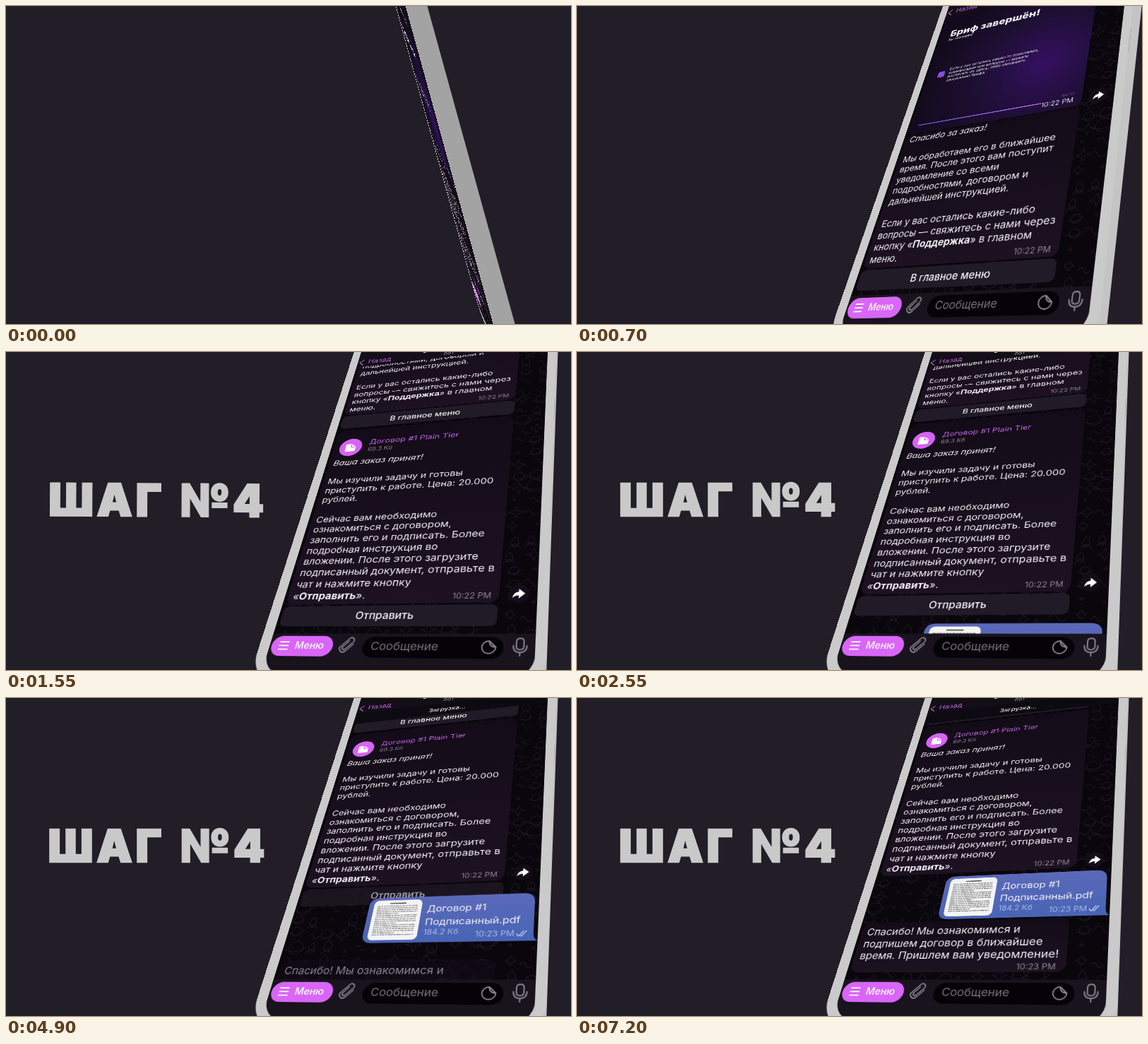
An HTML page for the animation above (7.25 s loop, 800 px wide and 450 px high).

```html
<!DOCTYPE html>
<html lang="ru">
<head>
<meta charset="utf-8">
<style>
  html, body { margin: 0; width: 100%; height: 100%; overflow: hidden; background: #211e28; }
  #stage { position: absolute; left: 0; top: 0; width: 800px; height: 450px; overflow: hidden; }
  #stage > svg { position: absolute; left: 0; top: 0; }
  #title text { font-size: 63px; font-weight: 900; letter-spacing: 5px; word-spacing: 4px;
    fill: #c9c9c9; stroke: #c9c9c9; stroke-width: 2.5px; }
  #phone { position: absolute; left: 0; top: 0; width: 0; height: 0; transform-origin: 0 0; }
  #phone svg { position: absolute; left: -17px; top: -120px; overflow: visible; }
  text { font-family: Inter, Roboto, sans-serif; white-space: pre; }
  #phone text { font-size: 17.4px; fill: #f4f1f6; }
  #phone .s { font-size: 13px; fill: #8d8593; }
  #phone .m { text-anchor: middle; font-weight: 500; }
  #phone .e { text-anchor: end; }
  #phone .i { font-style: italic; }
  #phone .v { fill: #c565e6; }
  #phone .b { font-size: 13px; fill: #a9b9e8; }
  .l { fill: none; stroke-width: 1.8; stroke-linecap: round; stroke-linejoin: round; }
</style>
</head>
<body>
<div id="stage">
  <svg width="800" height="450">
    <polygon id="side"/>
    <g id="title"><text x="59.5" y="232">ШАГ №4</text></g>
  </svg>
  <div id="phone"></div>
</div>
<script>
const $ = id => document.getElementById(id);
const PITCH = 21.7, SCREEN_W = 390, SCREEN_H = 668;

// drawing helpers in phone units
const text = (x, y, s, cls = '', more = '') => `<text x="${x}" y="${y}" class="${cls}" ${more}>${s}</text>`;
const rect = (x, y, w, h, r, fill, more = '') =>
  `<rect x="${x}" y="${y}" width="${w}" height="${h}" rx="${r}" fill="${fill}" ${more}/>`;
const line = (d, stroke, more = '') => `<path class="l" d="${d}" stroke="${stroke}" ${more}/>`;
const lines = (x, y, list) => list.map((s, i) => s && text(x, y + i * PITCH, s)).join('');
const button = (y, s) => rect(5, y, 331, 35, 9, '#211a27') + text(170, y + 23.5, s, 'm', 'style="font-size:17px"');
const share = y => `<circle cx="364" cy="${y}" r="15" fill="#140d19"/>
  <path d="M355 ${y + 7}q2-10 9-10v-5l9 8-9 8v-5q-5 0-9 4z" fill="#fff"/>`;

function doodles() {
  let seed = 11, d = '';
  const rnd = n => (seed = (seed * 16807) % 2147483647) / 2147483647 * n;
  const kinds = [
    r => `m${-r} 0a${r} ${r} 0 1 0 ${2 * r} 0a${r} ${r} 0 1 0 ${-2 * r} 0m${-r / 2} 2q${r * 1.5} ${r} ${r * 3} ${-4}`,
    r => `m0 ${-r}l3 ${r - 3} ${r - 3} 3 ${3 - r} 3-3 ${r - 3}-3 ${3 - r} ${3 - r}-3 ${r - 3}-3z`,
    r => `m0 ${-r}q${r} ${r} 4 ${2 * r}h-8q${4 - r} ${-r} 4 ${-2 * r}m-4 ${2 * r}l-5 5m13-5l5 5m-9-${r}a3 3 0 1 0 .1 0`,
    r => `m${-r} 0q${r / 2} ${-r} ${r} 0t${r} 0`,
    r => `m0 0a2 2 0 1 0 .1 0`
  ];
  for (let y = -90; y < 680; y += 26)
    for (let x = 10; x < 390; x += 28)
      d += `M${x + rnd(12)} ${y + rnd(12)}` + kinds[Math.floor(rnd(5))](7 + rnd(6));
  return line(d, '#23172b', 'style="stroke-width:1.1"');
}

const brief = rect(5, -1010, 331, 328, 14, 'url(#glow)') +
  text(28, -927, 'Бриф завершён!', '', 'style="font-size:23.6px;font-weight:800"') +
  text(28, -915, 'Вы молодец!', '', 'style="font-size:9px"') +
  ['Если у вас остались какие-то пожелания,', 'комментарии или вопросы — можете',
   'расписать их здесь, либо завершить', 'заполнение брифа.']
    .map((s, i) => text(54, -829 + i * 9.6, s, '', 'style="font-size:9px"')).join('') +
  rect(30, -830, 15, 15, 4, '#8a4be0') +
  rect(22, -702, 243, 2, 1, 'url(#bar)') +
  text(322, -708, 'Шаг 7/7', 'e', 'style="font-size:6px;fill:#8b57c8"') +
  text(322, -692, '10:22 PM', 's e', 'style="fill:#e8e2ee"') + share(-697);

const thanks = rect(5, -679, 331, 264, 14, 'url(#msg)') +
  text(14, -424 - 11 * PITCH, 'Спасибо за заказ!', 'i') +
  lines(14, -424 - 9 * PITCH, [
    'Мы обработаем его в ближайшее', 'время. После этого вам поступит', 'уведомление со всеми',
    'подробностями, договором и', 'дальнейшей инструкцией.', '',
    'Если у вас остались какие-либо', 'вопросы — свяжитесь с нами через',
    'кнопку «<tspan font-weight="700">Поддержка</tspan>» в главном', 'меню.']) +
  text(324, -422, '10:22 PM', 's e') + button(-412, 'В главное меню');

const contract = rect(5, -371, 331, 382, 14, 'url(#msg)') +
  '<circle cx="39" cy="-325.500" r="22" fill="#d863f5"/>' +
  '<path d="M30-333h10l8 7v10h-18z" fill="#fff" stroke="#fff" stroke-width="2" stroke-linejoin="round"/>' +
  line('M40-333v7h7', '#d863f5') +
  text(74, -330, 'Договор #1 Plain Tier', 'v', 'style="font-size:16.4px"') + text(74, -312.5, '69.3 Кб', 's') +
  text(14, 1.5 - 13 * PITCH, 'Ваша заказ принят!', 'i') +
  lines(14, 1.5 - 11 * PITCH, [
    'Мы изучили задачу и готовы', 'приступить к работе. Цена: 20.000', 'рублей.', '',
    'Сейчас вам необходимо', 'ознакомиться с договором,', 'заполнить его и подписать. Более',
    'подробная инструкция во', 'вложении. После этого загрузите', 'подписанный документ, отправьте в',
    'чат и нажмите кнопку', '«<tspan font-weight="700">Отправить</tspan>».']) +
  text(325, 4, '10:22 PM', 's e') + share(-3) + `<g id="send">${button(14, 'Отправить')}</g>`;

let page = rect(135, 0, 78, 73, 8, '#f3f3f3') + rect(161, 5, 26, 2, 0, '#555');
for (let i = 0; i < 16; i++)
  page += line(`M141 ${11 + i * 3.5}h${i % 5 == 4 ? 36 : 66}`, '#777',
    `style="stroke-width:1.3;stroke-linecap:butt" stroke-dasharray="${5 + i * 7 % 6} 1 3 1"`);

const pdf = '<path d="M143-5H368Q384-5 384 11V66Q384 75 390 78H143Q127 78 127 62V11Q127-5 143-5z" fill="url(#blue)"/>' + page +
  text(222, 24, 'Договор #1', '', 'style="font-size:16.5px"') +
  text(222, 47.5, 'Подписанный.pdf', '', 'style="font-size:16.5px"') +
  text(222, 65, '', 'b', 'id="size"') + text(357, 70, '10:23 PM', 'b e') +
  '<g id="busy"><circle cx="174" cy="36" r="23" fill="#26262cdd"/>' +
  line('M168 30l12 12M180 30l-12 12', '#fff') +
  '<circle id="ring" class="l" cx="174" cy="36" r="20" stroke="#fff" pathLength="100"/>' +
  line('M361 66a6 6 0 1 0 12 0a6 6 0 1 0-12 0M367 62v4h4', '#a9b9e8', 'style="stroke-width:1.3"') + '</g>' +
  `<g id="done">${line('M360 66l3 4 7-9M366 69l1 1 7-9', '#c3d0f5', 'style="stroke-width:1.4"')}</g>`;

const reply = rect(5, 570, 328, 90, 14, 'url(#msg)') +
  lines(14, 594, ['Спасибо! Мы ознакомимся и', 'подпишем договор в ближайшее', 'время. Пришлем вам уведомление!']) +
  text(319, 656, '10:23 PM', 's e');

const header = rect(0, -106, 390, 157, 0, '#130e18') + line('M13 29l-8 8 8 8', '#c565e6') +
  text(23, 42, 'Назад', 'v', 'style="font-size:17px"') + text(195, 28, 'Бланк заказа', 'm') + text(195, 44, 'бот', 's m') +
  `<g id="loading">${rect(0, 51, 390, 34, 0, '#0e0a12')}${text(195, 74, 'Загрузка…', 'm', 'style="font-size:14px"')}</g>`;

const footer = rect(0, 672, 390, 80, 0, '#18131d') +
  rect(3, 676, 98, 33, 16.5, '#d966f7') + line('M16 686h14M16 692h14M16 698h14', '#fff') +
  text(41, 697.5, 'Меню', '', 'style="font-size:15.5px;font-weight:600"') +
  line('M132 689l-10 11q-4 4-8 0t0-8l11-12q3-3 6 0t0 6l-10 11q-2 2-4 0t0-4l8-9', '#8b8590') +
  rect(147, 677, 201, 33, 16.5, '#050307') + text(159, 698.5, 'Сообщение', '', 'style="fill:#77717c"') +
  line('M328 683a9.500 9.500 0 1 0 9.500 9.500q-9 0-9.500-9.500l9.500 9.500', '#8b8590') +
  line('M370 679q5 0 5 5v7q0 5-5 5t-5-5v-7q0-5 5-5M361 690q0 10 9 10t9-10M370 700v5', '#8b8590');

$('phone').innerHTML = `<svg width="422" height="872" viewBox="-17 -120 422 872">
  <defs>
    <clipPath id="clip">${rect(0, -106, 390, 844, 34, '#000')}</clipPath>
    <radialGradient id="glow" cx=".75" cy=".65" r=".75">
      <stop stop-color="#341060"/><stop offset=".5" stop-color="#1e0f34"/><stop offset="1" stop-color="#130b1d"/></radialGradient>
    <linearGradient id="bar"><stop stop-color="#6a5af0"/><stop offset="1" stop-color="#c070f0"/></linearGradient>
    <linearGradient id="msg" x2="0" y2="1"><stop stop-color="#130c18"/><stop offset="1" stop-color="#1d1122"/></linearGradient>
    <linearGradient id="blue" x2="0" y2="1"><stop stop-color="#5b69b9"/><stop offset="1" stop-color="#4864b4"/></linearGradient>
  </defs>
  ${rect(402, 205, 5, 55, 2, '#b5b5b5')}${rect(-17, -120, 422, 872, 48, '#cacaca')}
  <g clip-path="url(#clip)">${rect(0, -106, 390, 844, 0, '#09060c')}${doodles()}
    <g id="chat">${brief}${thanks}<g id="contract">${contract}</g></g>
    <g id="pdf">${pdf}</g><g id="reply">${reply}</g>${header}${footer}</g></svg>`;

// screen corners: top left, top right, bottom right, bottom left
const EDGE = [[540, -45], [577, 45], [695, 470], [658, 380]];
const NEAR = [[529, -6], [783.6, -75], [730, 392], [389, 407]];
const REST = [[503, 0], [768.4, -32.7], [750.4, 395], [379.8, 395]];

const mix = (a, b, p) => a + (b - a) * p;
const mixQuad = (a, b, p) => a.map((c, i) => c.map((v, j) => mix(v, b[i][j], p)));

function homography([[x0, y0], [x1, y1], [x2, y2], [x3, y3]]) {
  const ax = x1 - x2, ay = y1 - y2, bx = x3 - x2, by = y3 - y2;
  const sx = x0 - x1 + x2 - x3, sy = y0 - y1 + y2 - y3, den = ax * by - bx * ay;
  const g = (sx * by - bx * sy) / den, h = (ax * sy - sx * ay) / den;
  return {
    a: (x1 - x0 + g * x1) / SCREEN_W, b: (x3 - x0 + h * x3) / SCREEN_H, c: x0,
    d: (y1 - y0 + g * y1) / SCREEN_W, e: (y3 - y0 + h * y3) / SCREEN_H, f: y0,
    g: g / SCREEN_W, h: h / SCREEN_H
  };
}

function project(m, u, v) {
  const w = m.g * u + m.h * v + 1;
  return [(m.a * u + m.b * v + m.c) / w, (m.d * u + m.e * v + m.f) / w];
}

function draw(t) {
  const span = (a, b) => Math.min(1, Math.max(0, (t - a) / (b - a)));
  const out = (a, b, n = 3) => 1 - (1 - span(a, b)) ** n;
  const inOut = (a, b) => { const p = span(a, b); return p * p * (3 - 2 * p); };
  const shift = (id, y) => $(id).setAttribute('transform', `translate(0 ${y})`);
  const show = (id, on) => $(id).setAttribute('opacity', +on);

  const turn = out(0, 700), settle = inOut(700, 1500);
  const m = homography(t < 700 ? mixQuad(EDGE, NEAR, turn) : mixQuad(NEAR, REST, settle));
  $('phone').style.transform =
    `matrix3d(${[m.a, m.d, 0, m.g, m.b, m.e, 0, m.h, 0, 0, 1, 0, m.c, m.f, 0, 1].map(v => v.toFixed(9))})`;

  // the side wall starts under the front face so that no seam shows
  const depth = t < 700 ? mix(30, 12, turn) : mix(12, 2, settle);
  const [p, q] = [project(m, 398, -110), project(m, 398, 745)];
  const reach = depth + project(m, 405, 400)[0] - project(m, 398, 400)[0];
  $('side').setAttribute('points', [p, [p[0] + reach, p[1]], [q[0] + reach, q[1]], q].join(' '));
  const grey = Math.round(mix(163, 196, turn));
  $('side').setAttribute('fill', `rgb(${grey},${grey},${grey})`);

  const enter = out(900, 1800, 4);
  $('title').setAttribute('transform',
    `translate(214 ${209 + 60 * (1 - enter)}) rotate(${60 * (1 - enter)}) scale(${enter} 1) translate(-214 -209)`);
  show('title', span(900, 1400));

  const first = inOut(950, 1400), second = inOut(2450, 2800), third = inOut(4680, 5100);
  shift('chat', 1041 - 430 * first - 92 * second - 53 * third);
  show('contract', first);
  show('send', 1 - third ** 2);
  shift('pdf', 680 - 97 * second - 94 * third);
  shift('reply', 150 * (1 - third));
  show('reply', third);

  const sent = Math.min(184.2, Math.max(0, (t - 2800) * 0.192)), ready = sent >= 184.2;
  $('size').textContent = ready ? '184.2 Кб' : sent.toFixed(1) + ' Кб / 184.2 Кб';
  $('ring').setAttribute('stroke-dasharray', `${sent / 1.842} 100`);
  show('busy', !ready);
  show('done', ready);
  show('loading', t >= 4600);
}

function tick() {
  draw(performance.now() % 7250);
  requestAnimationFrame(tick);
}
tick();
</script>
</body>
</html>
```
